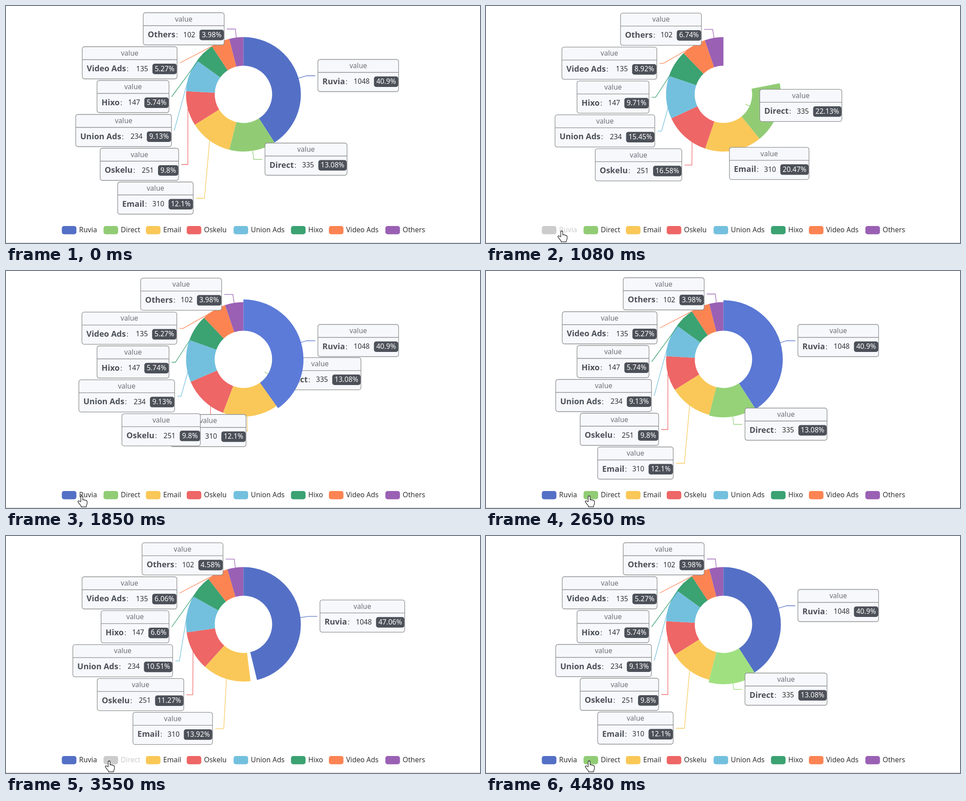
An HTML page with a canvas for the animation above (4660 ms loop, 1057 by 530 pixels).

```html
<!DOCTYPE html>
<html lang="en">
<head>
<meta charset="utf-8">
<title>Doughnut chart with legend toggling</title>
<style>
  html, body { margin: 0; width: 100%; height: 100%; overflow: hidden; background: #fff; }
  canvas { display: block; }
</style>
</head>
<body>
<canvas id="stage" width="1057" height="530"></canvas>
<script>
const ctx = document.getElementById('stage').getContext('2d');
const LOOP = 4660, CX = 529.5, CY = 197.5, R = 128, R_IN = 64;
const SANS = '"Noto Sans", "Open Sans", sans-serif';
const TEXT = `15.6px ${SANS}`, BOLD = `bold 18px ${SANS}`;

// spots: label anchor x, box top, elbow length for: all shown, first hidden, second hidden
const items = [
  { name: 'Ruvia', value: 1048, rgb: [84, 112, 198], legendX: 124.5, base: 135,
    spots: [[695.5, 119.5, 19], null, [700.9, 147, 19]] },
  { name: 'Direct', value: 335, rgb: [145, 204, 117], legendX: 217.5, base: 129,
    spots: [[577.5, 306.5, 19], [648.5, 48, 19], null] },
  { name: 'Email', value: 310, rgb: [250, 200, 88], legendX: 312, base: 123.5,
    spots: [[417.5, 393.5, 19], [687, 227, 19], [467.5, 394.5, 19]] },
  { name: 'Oskelu', value: 251, rgb: [238, 102, 102], legendX: 403, base: 139,
    spots: [[385, 318, 14.5], [496, 320.5, 19], [398.3, 318.7, 14]] },
  { name: 'Union Ads', value: 234, rgb: [115, 192, 222], legendX: 507.5, base: 168.5,
    spots: [[369, 242.5, 0], [385, 244.5, 19], [372, 243, 10.5]] },
  { name: 'Hixo', value: 147, rgb: [59, 162, 114], legendX: 635.5, base: 115.5,
    spots: [[363.5, 166.5, 0], [363.5, 168.8, 19], [363.5, 167, 0]] },
  { name: 'Video Ads', value: 135, rgb: [252, 132, 82], legendX: 720, base: 166.5,
    spots: [[381.5, 91, 0], [380, 93, 19], [381, 91.3, 0]] },
  { name: 'Others', value: 102, rgb: [154, 96, 180], legendX: 846, base: 135.5,
    spots: [[486.5, 15, 19], [473.5, 17, 19], [483.5, 15.2, 19]] },
];

const ALL = 0, NO_FIRST = 1, NO_SECOND = 2;
const phases = [
  { toggle: -2000, start: -2000, layout: ALL, order: [0, 1, 2, 3, 4, 5, 6, 7] },
  { toggle: 837, start: 837, layout: NO_FIRST, order: [1, 2, 3, 4, 5, 6, 7] },
  { toggle: 1540, start: 1590, layout: ALL, order: [1, 2, 3, 4, 5, 6, 7, 0] },
  { toggle: 3214, start: 3214, layout: NO_SECOND, order: [2, 3, 4, 5, 6, 7, 0] },
  { toggle: 3840, start: 3855, layout: ALL, order: [2, 3, 4, 5, 6, 7, 0, 1] },
];
const ENTER_DELAY = 38;
const hovers = [
  { item: 0, from: 510, to: 837 }, { item: 0, from: 1628, to: 2620 },
  { item: 1, from: 2620, to: 3214 }, { item: 1, from: 3893, to: 1e9 },
];
const cursorPath = [[40, 198, 531], [510, 173, 511], [560, 169, 503],
                    [2320, 169, 503], [2650, 230, 503], [LOOP, 230, 503]];

const clamp = v => Math.min(1, Math.max(0, v));
const lerp = (a, b, p) => a + (b - a) * p;
const cubicOut = v => 1 - (1 - clamp(v)) ** 3;
const cubicInOut = v => (v = clamp(v)) < .5 ? 4 * v ** 3 : 1 - (2 - 2 * v) ** 3 / 2;

// Two-decimal percentages that add up to exactly 100
function percents(values) {
  const total = values.reduce((a, b) => a + b, 0);
  const exact = values.map(v => v / total * 1e4);
  const whole = exact.map(Math.floor);
  const rank = exact.map((v, i) => [v - whole[i], i]).sort((a, b) => b[0] - a[0]);
  const missing = 1e4 - whole.reduce((a, b) => a + b, 0);
  for (let k = 0; k < missing; k++) whole[rank[k][1]]++;
  return whole.map(v => v / 100 + '%');
}

function makeLayout(index) {
  const values = items.map(it => it.spots[index] ? it.value : 0);
  const total = values.reduce((a, b) => a + b, 0);
  const pcts = percents(values);
  let sum = 0;
  return items.map((it, i) => {
    const a0 = sum / total * 2 * Math.PI;
    sum += values[i];
    const a1 = sum / total * 2 * Math.PI, mid = (a0 + a1) / 2;
    if (!it.spots[index]) return null;
    const [x, y, elbow] = it.spots[index];
    const side = mid < Math.PI ? 1 : -1, endX = x - 6 * side;
    const line = [CX + R * Math.sin(mid), CY - R * Math.cos(mid),
                  endX - elbow * side, y + 36.5, endX, y + 36.5];
    return { a0, a1, x, y, side, line, pct: pcts[i] };
  });
}
const layouts = [ALL, NO_FIRST, NO_SECOND].map(makeLayout);

function emphasis(item, t) {
  for (const h of hovers) {
    if (h.item !== item || t < h.from) continue;
    if (t < h.to) return { amount: cubicOut((t - h.from) / 300), active: true };
    if (t < h.to + 300) return { amount: 1 - cubicOut((t - h.to) / 300), active: false };
  }
  return { amount: 0, active: false };
}

function pose(i, t, phase, before) {
  const to = layouts[phase.layout][i], from = layouts[before.layout][i];
  const glow = emphasis(i, t);
  const color = `rgb(${items[i].rgb.map(c => Math.min(255, c * (1 + .1 * glow.amount)))})`;
  const part = { ...to, i, color, radius: R + 6 * glow.amount, active: glow.active, alpha: 1 };
  if (from) {
    const p = cubicInOut((t - phase.start) / 500);
    for (const key of ['a0', 'a1', 'x', 'y']) part[key] = lerp(from[key], to[key], p);
    part.line = to.line.map((v, k) => lerp(from.line[k], v, p));
  } else {
    part.alpha = cubicOut((t - phase.start - ENTER_DELAY) / 300);
    part.a1 = lerp(to.a0, to.a1, part.alpha);
  }
  return part;
}

function drawSector({ a0, a1, radius, color }) {
  if (a1 - a0 < 1e-4) return;
  const q = Math.PI / 2;
  ctx.fillStyle = color;
  ctx.beginPath();
  ctx.arc(CX, CY, radius, a0 - q, a1 - q);
  ctx.arc(CX, CY, R_IN, a1 - q, a0 - q, true);
  ctx.fill();
}

function drawLine({ line, color, alpha }) {
  ctx.globalAlpha = alpha;
  ctx.strokeStyle = color;
  ctx.lineWidth = 1.3;
  ctx.beginPath();
  for (let k = 0; k < 6; k += 2) ctx.lineTo(line[k], line[k + 1]);
  ctx.stroke();
  ctx.globalAlpha = 1;
}

function write(text, x, y, color, font = TEXT, align = 'left') {
  ctx.font = font;
  ctx.textAlign = align;
  ctx.fillStyle = color;
  ctx.fillText(text, x, y);
}

function roundBox(x, y, w, h, r, fill) {
  ctx.beginPath();
  ctx.roundRect(x, y, w, h, r);
  ctx.fillStyle = fill;
  ctx.fill();
}

function drawLabel({ i, x, y, side, pct, alpha }) {
  const { name, value, base } = items[i];
  const w = base + 9 * pct.length;
  const left = side > 0 ? x : x - w;
  ctx.globalAlpha = alpha;
  roundBox(left, y, w, 72, 5, '#f6f8fc');
  ctx.strokeStyle = '#8c8d8e';
  ctx.lineWidth = 1.3;
  ctx.stroke();
  ctx.beginPath();
  ctx.moveTo(left, y + 29);
  ctx.lineTo(left + w, y + 29);
  ctx.stroke();
  write('value', left + w / 2, y + 19.5, '#6e7079', TEXT, 'center');

  write(name, left + 10, y + 55, '#4c5058', BOLD);
  write(':', left + 11.5 + ctx.measureText(name).width, y + 55, '#4c5058');
  ctx.font = BOLD;
  const badge = 9 * pct.length + 9.3, badgeX = left + w - badge - .7;
  write(String(value), badgeX - 9.5, y + 54.5, '#333', TEXT, 'right');
  roundBox(badgeX, y + 38, badge, 23.5, 5, '#4c5058');
  write(pct, badgeX + badge / 2, y + 54.5, '#fff', TEXT, 'center');
  ctx.globalAlpha = 1;
}

function drawLegend(layout) {
  items.forEach((it, i) => {
    const on = layouts[layout][i];
    roundBox(it.legendX, 492, 32.5, 18.5, 5, on ? `rgb(${it.rgb})` : '#ccc');
    write(it.name, it.legendX + 38.5, 506, on ? '#333' : '#ccc');
  });
}

const hand = new Path2D('M-2.2 13V2.2a2.2 2.2 0 0 1 4.4 0V9c.8-1 3.4-.9 3.7.6 1-.9 3-.5 3.3 1 ' +
  '1.1-.6 2.6 0 2.6 1.8v4.6c0 2-1.5 3.6-1.8 5.2V24.3H-1.6v-1.8C-3 20.5-6 17.3-8.3 13.6c-1.2-2 .8-3.6 2.5-2.2z');
const arrow = new Path2D('M0 0V17L4 13.3 6.6 19.4 9.2 18.3 6.6 12.4H12z');

function drawCursor(t) {
  const k = cursorPath.findIndex(p => t < p[0]);
  if (k < 1) return;
  const [t0, x0, y0] = cursorPath[k - 1], [t1, x1, y1] = cursorPath[k];
  const p = (t - t0) / (t1 - t0), x = lerp(x0, x1, p), y = lerp(y0, y1, p);
  const shape = y < 512 && (x < 205 || x > 217) ? hand : arrow;
  ctx.save();
  ctx.translate(x, y);
  ctx.lineWidth = 1.3;
  ctx.lineJoin = 'round';
  ctx.fillStyle = '#fff';
  ctx.strokeStyle = '#222';
  ctx.fill(shape);
  ctx.stroke(shape);
  ctx.restore();
}

function draw(t) {
  ctx.fillStyle = '#fff';
  ctx.fillRect(0, 0, 1057, 530);
  ctx.fillStyle = '#ccc';
  ctx.fillRect(0, 529, 1057, 1);

  const n = phases.findLastIndex(ph => t >= ph.toggle);
  const phase = phases[n], before = phases[Math.max(0, n - 1)];
  const parts = phase.order.map(i => pose(i, t, phase, before));
  parts.filter(p => !p.active).forEach(drawSector);
  parts.forEach(drawLine);
  for (const part of parts) {
    if (part.active) drawSector(part);
    drawLabel(part);
  }
  drawLegend(phase.layout);
  drawCursor(t);
}

const begin = performance.now();
function tick() {
  draw((performance.now() - begin) % LOOP);
  requestAnimationFrame(tick);
}
tick();
</script>
</body>
</html>
```
